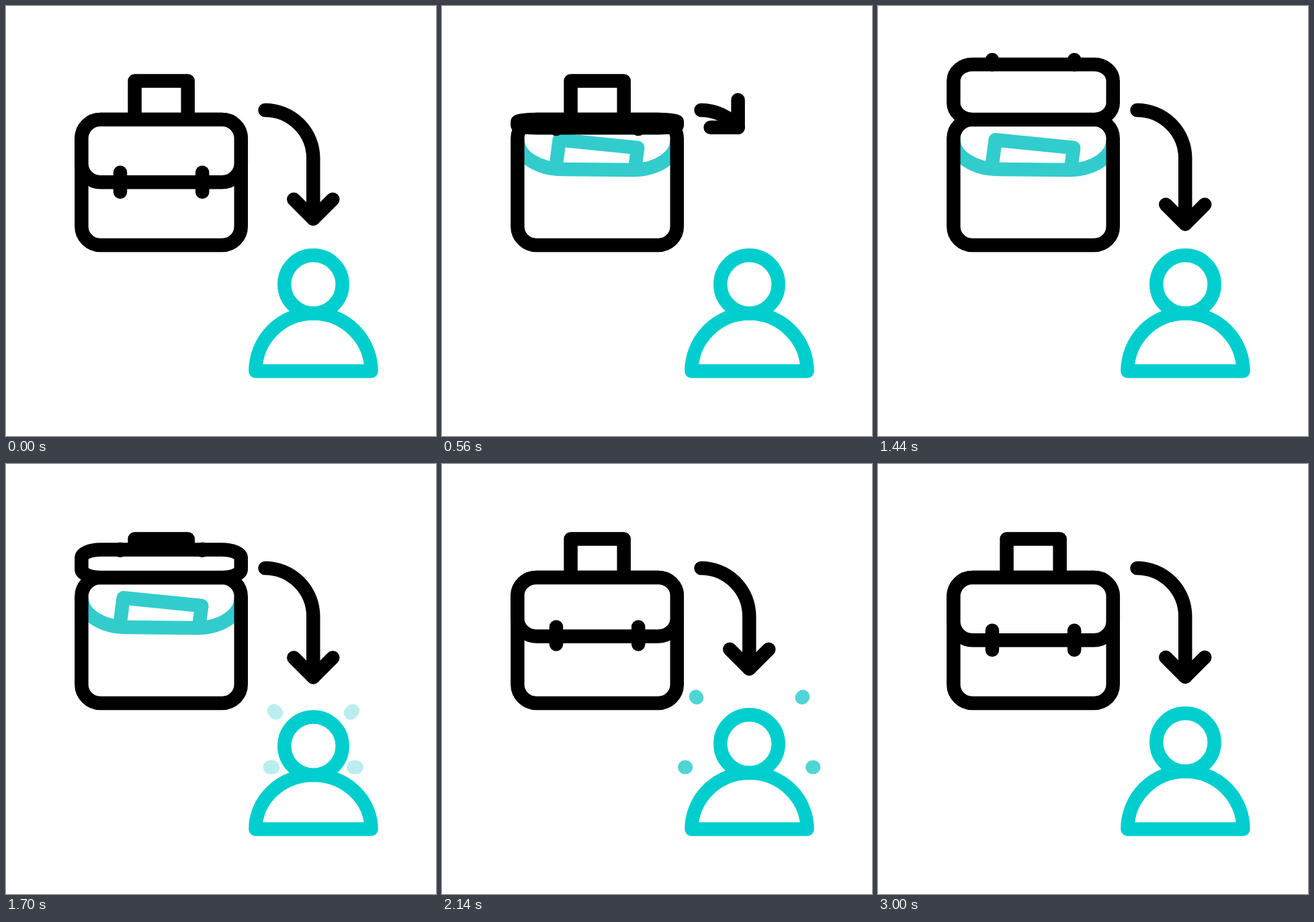
These frames come from a looping animation (640x640 px, 3320 ms). An HTML page with a canvas:

```html
<!DOCTYPE html>
<html lang="en">
<head>
<meta charset="utf-8">
<title>Briefcase to person</title>
<style>
html, body { margin: 0; width: 100%; height: 100%; overflow: hidden; background: #fff; }
canvas { display: block; width: 100vw; height: 100vh; }
</style>
</head>
<body>
<canvas id="stage" width="640" height="640"></canvas>
<script>
const ctx = document.getElementById('stage').getContext('2d');
const LOOP = 3320, BLACK = '#000', TEAL = '#00cece', SOFT_TEAL = '#33cccc';

const clamp = x => Math.min(1, Math.max(0, x));
const smooth = x => x * x * (3 - 2 * x);

// Eased value at time t through [time, value] keys.
function keyed(t, keys) {
  let [t0, v0] = keys[0];
  for (const [t1, v1] of keys.slice(1)) {
    if (t < t1) return v0 + (v1 - v0) * smooth(clamp((t - t0) / (t1 - t0)));
    [t0, v0] = [t1, v1];
  }
  return v0;
}

function stroke(path, color, fill) {
  const shape = new Path2D(path);
  if (fill) {
    ctx.fillStyle = fill;
    ctx.fill(shape);
  }
  ctx.strokeStyle = color;
  ctx.stroke(shape);
}

function roundedBox(left, top, right, bottom, rx, ry) {
  const corner = (x, y) => `a${rx} ${ry} 0 0 1 ${x} ${y}`;
  return `M${left + rx} ${top}H${right - rx}${corner(rx, ry)}V${bottom - ry}${corner(-rx, ry)}` +
    `H${left + rx}${corner(-rx, -ry)}V${top + ry}${corner(rx, -ry)}Z`;
}

function drawCase(t) {
  const left = 112.4, right = 349.8, hinge = 169;
  const fold = keyed(t, [[200, 1], [960, -0.88], [1463, -0.88], [2225, 1]]);
  const edge = hinge + 93.3 * fold;

  ctx.lineCap = 'butt';
  stroke('M191.6 169V111.4H270.7V169', BLACK);
  stroke('M169 243L174.7 199.3L291.3 211L287 243', SOFT_TEAL, '#fff');
  stroke('M112.6 199A67 44 0 0 0 180 243L285 244A65 44 0 0 0 349.6 199', SOFT_TEAL);
  stroke(roundedBox(left, hinge, right, 356, 28, 28), BLACK);
  stroke(roundedBox(left, Math.min(hinge, edge), right, Math.max(hinge, edge), 28, 28 * Math.abs(fold)), BLACK, '#fff');

  // Clasps shrink to dots as the flap turns edge-on.
  const closed = Math.max(fold, 0), opened = Math.max(-fold, 0);
  const top = edge + Math.min(-14.5 * closed ** 0.7, -10 * opened ** 3);
  const bottom = edge + Math.max(14.5 * closed ** 3, 2.2 * (1 - Math.abs(fold)));
  ctx.lineCap = 'round';
  for (const x of [170, 292.2]) stroke(`M${x} ${top}V${bottom}`, BLACK);
}

function drawArrow(t) {
  const x0 = 385.5, y0 = 155, r = 71.8, bend = r * Math.PI / 2, full = bend + 89.9, short = 56.1;
  const length = keyed(t, [
    [200, full], [310, full + 25], [595, short], [1200, short],
    [1500, full + 25], [1830, full - 12], [2400, full - 12], [3000, full]
  ]);
  const angle = Math.min(length, bend) / r;
  const x = x0 + r * Math.sin(angle);
  const y = y0 + r * (1 - Math.cos(angle)) + Math.max(0, length - bend);
  const heading = Math.min(90, 36.3 + 1.28 * (length - short));

  stroke(`M${x0} ${y0}A${r} ${r} 0 0 1 ${x} ${y0 + r * (1 - Math.cos(angle))}L${x} ${y}`, BLACK);
  ctx.save();
  ctx.translate(x, y);
  ctx.rotate((heading - 90) * Math.PI / 180);
  stroke('M-29 -29L0 0L29 -29', BLACK);
  ctx.restore();
}

function drawPerson(t) {
  const dip = keyed(t, [[1500, 0], [1880, 10.2], [2260, 0]]);
  stroke(`M371.4 543.6A86.1 ${86.1 - dip} 0 0 1 543.6 543.6Z`, TEAL);
  ctx.beginPath();
  ctx.arc(457.5, 414.2 + dip, 43.2, 0, 2 * Math.PI);
  ctx.stroke();
}

function drawRays(t) {
  const progress = clamp((t - 1500) / 760);
  const move = smooth(progress);
  const half = 4 * Math.sin(Math.PI * progress) ** 2;
  ctx.globalAlpha = Math.min(clamp((t - 1640) / 180), clamp((2260 - t) / 140));
  for (const side of [-1, 1]) {
    const x = 457.2 + side * (54.8 + 43.1 * move);
    stroke(`M${x - half} 451.3H${x + half}`, SOFT_TEAL);
    const dx = 52 + 28.9 * move, y = 374 - 28.9 * move, d = half * Math.SQRT1_2;
    stroke(`M${457.5 + side * (dx - d)} ${y + d}L${457.5 + side * (dx + d)} ${y - d}`, SOFT_TEAL);
  }
  ctx.globalAlpha = 1;
}

function frame() {
  const t = performance.now() % LOOP;
  ctx.fillStyle = '#fff';
  ctx.fillRect(0, 0, 640, 640);
  ctx.lineWidth = 20.5;
  ctx.lineJoin = 'round';
  drawCase(t);
  drawArrow(t);
  drawPerson(t);
  drawRays(t);
  requestAnimationFrame(frame);
}
frame();
</script>
</body>
</html>
```
